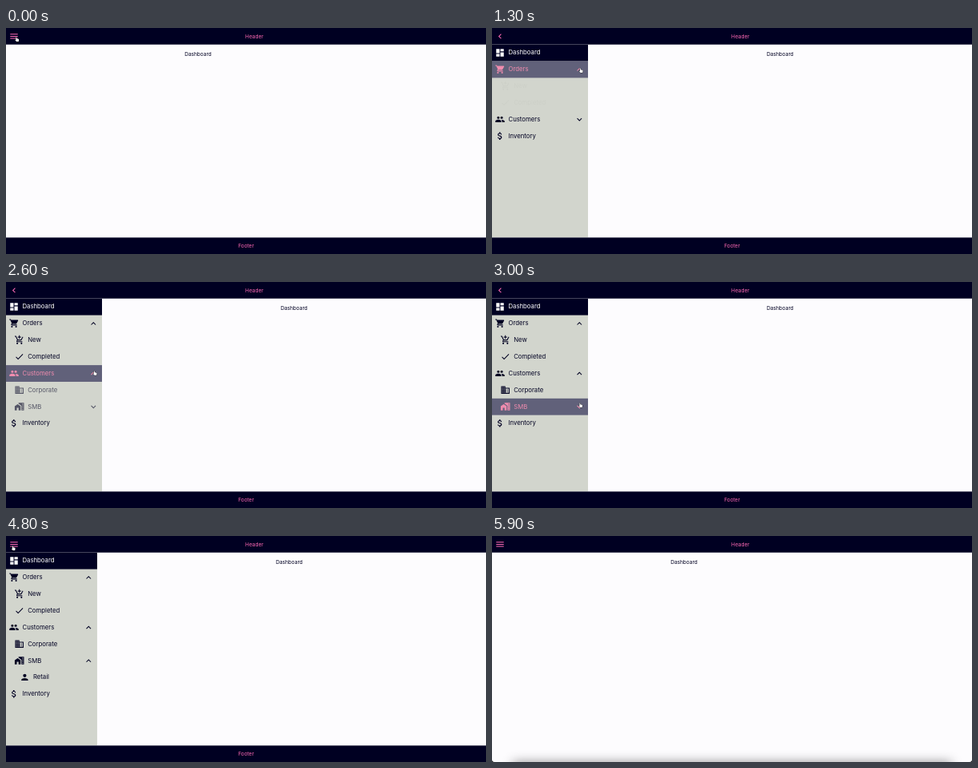
Animation of 600x283 px, one loop 6400 ms. Source, as an HTML page with a canvas:

```html
<!DOCTYPE html>
<html lang="en">
<head>
<meta charset="utf-8">
<title>Sidebar menu</title>
<style>
html, body { margin: 0; width: 100%; height: 100%; overflow: hidden; background: #fdfcfe; }
canvas { display: block; width: 600px; height: 283px; }
</style>
</head>
<body>
<canvas id="stage"></canvas>
<script>
const W = 600, H = 283, LOOP = 6400, STEP = 100;
const NAVY = '#000022', PINK = '#ff69b4', PALE = '#f08cae';
const SIDE = '#d2d5cd', PAGE = '#fdfcfe', HOVER = '#61617a';
const BAR = 20.7, ROW = 20.85, FOOT = 262.4, OPEN_W = 120;

const canvas = document.getElementById('stage');
const ctx = canvas.getContext('2d');
const dpr = window.devicePixelRatio || 1;
canvas.width = W * dpr;
canvas.height = H * dpr;

const dot = (x, y, r) => `M${x - r} ${y}a${r} ${r} 0 1 0 ${2 * r} 0a${r} ${r} 0 1 0 ${-2 * r} 0z`;
const box = (x, y, w, h) => `M${x} ${y}h${w}v${h}h${-w}z`;
const wheels = dot(7, 20, 2) + dot(17, 20, 2);
let panes = '';
for (let y = 5; y < 20; y += 4) panes += box(4, y, 2, 2) + box(8, y, 2, 2);

// Icons on a 24 unit grid
const icons = {
  dashboard: box(3, 3, 8, 10) + box(3, 15, 8, 6) + box(13, 11, 8, 10) + box(13, 3, 8, 6),
  cart: 'M1 2h3.3l.9 2h16l.7 1.5-3.9 6.9q-.6 1.1-1.8 1.1H8.1l-.9 1.2.2.3H19v2H7q-2.4 0-1.9-2.5l1.5-2.9L3 4H1z' + wheels,
  addCart: 'M1 2h3.3l4.3 9h7l3.9-7 1.7 1-3.9 7q-.6 1-1.7 1H8.1L7 15h12v2H7q-2.4 0-1.9-2.4l1.5-3L3 4H1z' +
    'M11 9h2V6h3V4h-3V1h-2v3H8v2h3z' + wheels,
  check: 'M9 16.2L4.8 12l-1.4 1.4L9 19 21 7l-1.4-1.4z',
  people: dot(8, 8, 3) + dot(16, 8, 3) +
    'M1 19v-2.5C1 14 5.7 13 8 13s7 1 7 3.5V19zM17 19v-2.5q0-2-2-3.4C17.5 12.8 23 14 23 16.5V19z',
  office: 'M12 7V3H2v18h20V7z' + panes +
    'M20 19h-8v-2h2v-2h-2v-2h2v-2h-2V9h8z' + box(16, 11, 2, 2) + box(16, 15, 2, 2),
  homeWork: 'M1 11v10h5v-6h4v6h5V11L8 6z M10 3v2l7 5v11h6V3z' +
    [5, 9, 13, 17].map(y => box(19, y, 2, 2)).join(''),
  person: dot(12, 8, 4) + 'M4 20v-2c0-2.7 5.3-4 8-4s8 1.3 8 4v2z',
  money: 'M11.8 10.9c-2.3-.6-3-1.2-3-2.2 0-1 1-1.8 2.7-1.8 1.8 0 2.4.9 2.5 2.1h2.2c-.1-1.7-1.1-3.3-3.2-3.8V3h-3v2.2' +
    'c-1.9.4-3.5 1.6-3.5 3.6 0 2.3 1.9 3.4 4.7 4.1 2.5.6 3 1.5 3 2.4 0 .7-.5 1.8-2.7 1.8-2.1 0-2.9-.9-3-2.1H6.3' +
    'c.1 2.2 1.8 3.4 3.7 3.8V21h3v-2.1c2-.4 3.5-1.5 3.5-3.6 0-2.8-2.4-3.8-4.7-4.4z',
  more: 'M16.6 8.6L12 13.2 7.4 8.6 6 10l6 6 6-6z',
  less: 'M12 8l-6 6 1.4 1.4 4.6-4.6 4.6 4.6L18 14z',
  menu: box(3, 6, 18, 2) + box(3, 11, 18, 2) + box(3, 16, 18, 2),
  back: 'M15.4 7.4L14 6l-6 6 6 6 1.4-1.4-4.6-4.6z'
};
for (const k in icons) icons[k] = new Path2D(icons[k]);

const hand = new Path2D('M3 9V1.5q1-1.4 2 0V5l5 1.2q1.2.4 1 1.8L10.3 13H4.6L.5 8.6Q1 7 3 9z');

// Menu tree; "at" is when a branch is opened
const items = [
  { label: 'Dashboard', icon: 'dashboard', active: true },
  { label: 'Orders', icon: 'cart', at: 1290, kids: [
    { label: 'New', icon: 'addCart' },
    { label: 'Completed', icon: 'check' }
  ] },
  { label: 'Customers', icon: 'people', at: 2390, kids: [
    { label: 'Corporate', icon: 'office' },
    { label: 'SMB', icon: 'homeWork', at: 3390, kids: [
      { label: 'Retail', icon: 'person' }
    ] }
  ] },
  { label: 'Inventory', icon: 'money' }
];

const OPEN_AT = 70, CLOSE_AT = 4780, SLIDE = 300, FADE = 350, LEAVE = 5200;

// Pointer stops: time, x, y
const stops = [
  [0, 13, 14], [400, 13, 14], [1100, 110.5, 53], [1450, 110.5, 53],
  [1900, 110.5, 112], [2550, 110.5, 112], [2950, 110, 154], [3800, 110, 154],
  [4600, 8.5, 15], [LOOP, 8.5, 15]
];

const clamp = v => Math.max(0, Math.min(1, v));

// cubic-bezier(.25, .1, .25, 1)
function ease(p) {
  p = clamp(p);
  let lo = 0, hi = 1, s = p;
  for (let i = 0; i < 24; i++) {
    s = (lo + hi) / 2;
    const x = 0.75 * s * (1 - s) + s ** 3;
    if (x < p) lo = s; else hi = s;
  }
  return 0.3 * s * (1 - s) ** 2 + 3 * (1 - s) * s * s + s ** 3;
}

function pointer(t) {
  const i = stops.findIndex(s => s[0] > t);
  const [t0, x0, y0] = stops[i - 1], [t1, x1, y1] = stops[i];
  const p = (t - t0) / (t1 - t0), k = p * p * (3 - 2 * p);
  return { x: x0 + (x1 - x0) * k, y: y0 + (y1 - y0) * k };
}

function rect(x, y, w, h, color) {
  ctx.fillStyle = color;
  ctx.fillRect(x, y, w, h);
}

function text(str, x, y, size, color, align = 'left') {
  ctx.font = `${size}px Inter, sans-serif`;
  ctx.textAlign = align;
  ctx.textBaseline = 'alphabetic';
  ctx.fillStyle = color;
  ctx.fillText(str, x, y + size * 0.36);
}

function icon(name, cx, cy, color, size = 12.6) {
  ctx.save();
  ctx.translate(cx - size / 2, cy - size / 2);
  ctx.scale(size / 24, size / 24);
  ctx.fillStyle = color;
  ctx.fill(icons[name], 'evenodd');
  ctx.restore();
}

function drawItems(list, t, w, mouse, level, row, alpha) {
  for (const it of list) {
    const top = BAR + row * ROW, mid = top + ROW / 2 - 0.5;
    const hover = mouse.x < w && mouse.y >= top && mouse.y < top + ROW;
    const open = it.kids && t >= it.at;
    const shift = level * 6.7;
    const color = it.active ? '#fff' : hover ? PALE : NAVY;
    ctx.globalAlpha = alpha;
    if (it.active) rect(0, top, w, ROW, NAVY);
    else if (hover) rect(0, top, w, ROW, HOVER);
    icon(it.icon, 10 + shift, mid + 0.3, color);
    text(it.label, 20.5 + shift, mid, 7.75, color);
    if (it.kids) {
      const end = 20.5 + shift + ctx.measureText(it.label).width;
      icon(open ? 'less' : 'more', Math.max(end + 9, w - 10.7), mid + 0.6, color);
    }
    row++;
    if (open) row = drawItems(it.kids, t, w, mouse, level + 1, row, clamp((t - it.at) / FADE));
  }
  ctx.globalAlpha = 1;
  return row;
}

function drawSide(t, w, mouse) {
  ctx.save();
  ctx.beginPath();
  ctx.rect(0, BAR, w, FOOT - BAR);
  ctx.clip();
  rect(0, BAR, w, FOOT - BAR, SIDE);
  drawItems(items, t, w, mouse, 0, 0, 1);
  ctx.restore();
}

function drawHand({ x, y }) {
  ctx.save();
  ctx.translate(x - 2, y - 3);
  ctx.scale(0.46, 0.46);
  ctx.lineWidth = 1.6;
  ctx.strokeStyle = '#111';
  ctx.fillStyle = '#fff';
  ctx.stroke(hand);
  ctx.fill(hand);
  ctx.restore();
}

// Soft shadow along the bottom edge and dark rounded corners
function drawEdge() {
  ctx.save();
  ctx.shadowColor = 'rgba(0,0,0,.42)';
  ctx.shadowBlur = 14 * dpr;
  ctx.shadowOffsetY = -20 * dpr;
  rect(26, H + 20, W - 52, 16, '#000');
  ctx.restore();
  ctx.fillStyle = '#000';
  for (const [x, d] of [[0, 1], [W, -1]]) {
    ctx.beginPath();
    ctx.moveTo(x, H - 3);
    ctx.quadraticCurveTo(x, H, x + 3 * d, H);
    ctx.lineTo(x, H);
    ctx.fill();
  }
}

function draw(t) {
  const shown = t >= OPEN_AT && t < CLOSE_AT;
  const w = OPEN_W * (ease((t - OPEN_AT) / SLIDE) - ease((t - CLOSE_AT) / SLIDE));
  const mouse = pointer(t), left = t >= LEAVE;

  ctx.setTransform(dpr, 0, 0, dpr, 0, 0);
  rect(0, 0, W, H, PAGE);
  text('Dashboard', 240 + w, 33, 6.5, NAVY, 'center');
  if (w > 0) drawSide(t, w, mouse);

  rect(0, 0, W, BAR, NAVY);
  text('Header', 310.4, 10.4, 6.5, PINK, 'center');
  icon(shown ? 'back' : 'menu', 10, 10.4, PINK);

  if (left) {
    drawEdge();
  } else {
    rect(0, FOOT, W, H - FOOT, NAVY);
    text('Footer', 300, 272.8, 6.5, PINK, 'center');
    drawHand(mouse);
  }
}

function tick() {
  const t = performance.now() % LOOP;
  draw(Math.floor(t / STEP) * STEP);
  requestAnimationFrame(tick);
}
tick();
</script>
</body>
</html>
```
